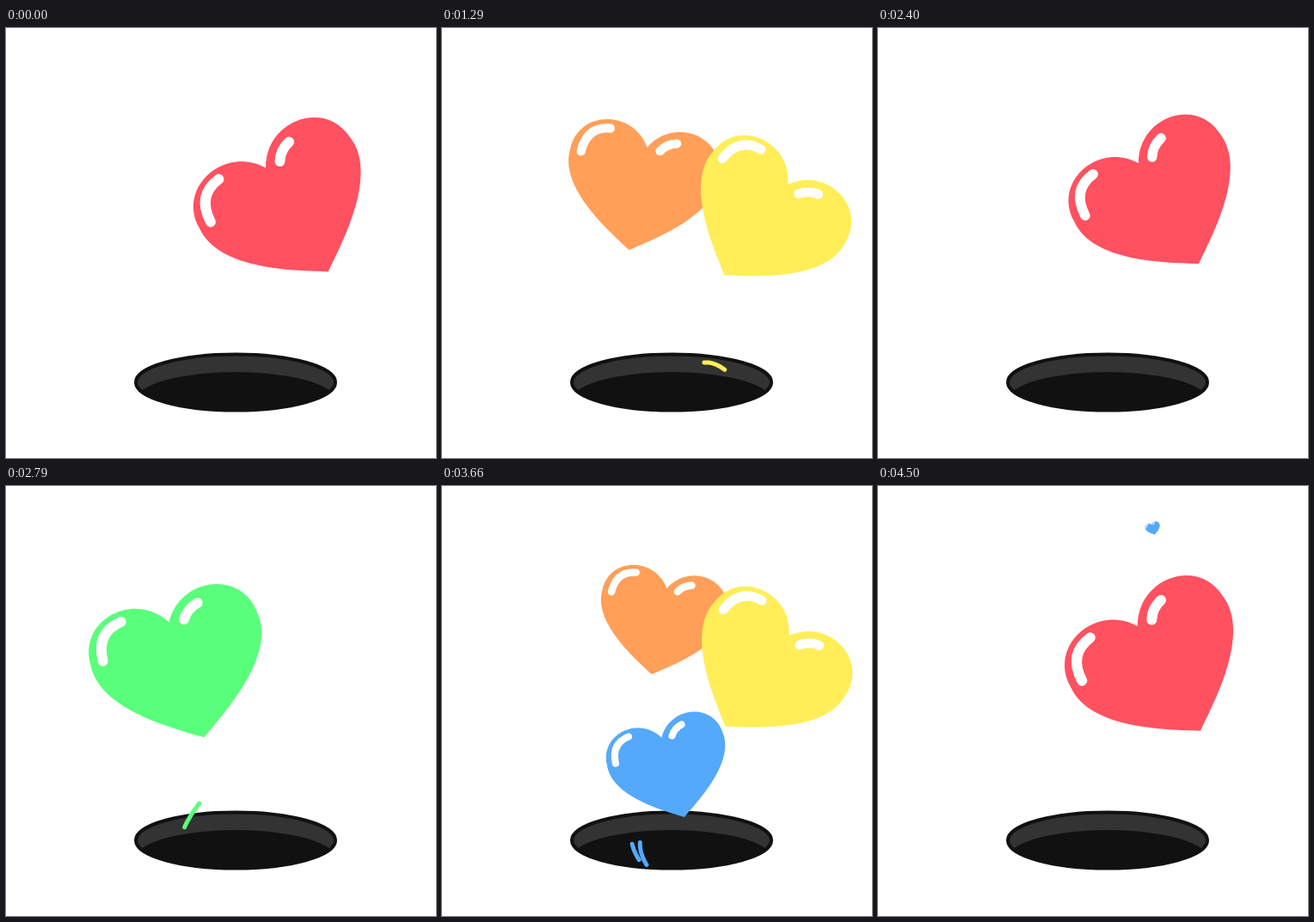
Recreate the animation shown at these times as an HTML page with a canvas. Size 500 by 500 pixels, loop 4530 ms.

```html
<!DOCTYPE html>
<html>
<head>
<meta charset="utf-8">
<style>
  html, body { margin: 0; height: 100%; overflow: hidden; background: #fff; }
  canvas { display: block; }
</style>
</head>
<body>
<canvas id="stage" width="500" height="500"></canvas>
<script>
const ctx = document.getElementById('stage').getContext('2d');
const PERIOD = 2265;          // all five hearts pop once; the loop is two rounds
const HOLE = [268, 412];
const TRAIL_LIFE = 380;

// rest/end: heart centre; trail: quadratic curve of the splash line
const hearts = [
  { color: '#ff5160', birth: 1811, life: 960, power: 6.6, size: 1, angle: 31,
    rest: [331, 211], end: [322, 18], trail: [[328, 415], [345, 380], [375, 365]] },
  { color: '#59ff7b', birth: 205, life: 894, power: 4.3, size: 1, angle: 17,
    rest: [203.5, 210], end: [284, 18], trail: [[235, 421], [178, 430], [227, 366]] },
  { color: '#ff9f58', birth: 690, life: 950, power: 4.3, size: .99, angle: -10,
    rest: [206, 213], end: [380, 18], trail: [[250, 425], [220, 343], [255, 364]] },
  { color: '#ffee58', birth: 990, life: 910, power: 4.3, size: .93, angle: -35,
    rest: [376, 221], end: [344, 13], trail: [[268, 432], [293, 367], [332, 400]] },
  { color: '#54a9fa', birth: 1350, life: 897, power: 7, size: 1.01, angle: 16,
    rest: [263, 222], end: [325, 34], trail: [[230, 436], [200, 390], [262, 366]] }
];

// Tip at the origin, cleft 142 above it
const heartShape = new Path2D(
  'M0 0C30-20 110-67 103-122C101-176 28-190 0-142C-28-190-101-176-103-122C-110-67-30-20 0 0Z');
const shine = new Path2D('M-54-159Q-86-156-88-121M39-154Q25-151 18-140');

const mix = (a, b, k) => a + (b - a) * k;
const mixPoint = (p, q, k) => p.map((v, i) => mix(v, q[i], k));

function ellipse(y, rx, ry) {
  ctx.beginPath();
  ctx.ellipse(267, y, rx, ry, 0, 0, Math.PI * 2);
}

function drawHole() {
  ctx.save();
  ellipse(412, 116, 33);
  ctx.fillStyle = '#333';
  ctx.fill();
  ctx.clip();
  ellipse(434.5, 118, 34.5);
  ctx.fillStyle = '#111';
  ctx.fill();
  ctx.restore();
  ellipse(412, 116, 32.5);
  ctx.strokeStyle = '#111';
  ctx.lineWidth = 4;
  ctx.stroke();
}

function drawTrail({ color, trail: [a, b, c] }, age, dx, dy) {
  const u = age / TRAIL_LIFE;
  if (u <= 0 || u >= 1) return;
  const tail = u * u, head = 1 - (1 - u) ** 2;
  ctx.beginPath();
  for (let i = 0; i <= 12; i++) {
    const k = mix(tail, head, i / 12);
    const [x, y] = mixPoint(mixPoint(a, b, k), mixPoint(b, c, k), k);
    ctx.lineTo(x + dx, y + dy);
  }
  ctx.strokeStyle = color;
  ctx.lineWidth = 5;
  ctx.stroke();
}

function drawHeart(heart, age) {
  if (age >= heart.life) return;
  const arrive = 1 - Math.exp(-age / 80);
  const emerge = 1 - Math.exp(-((age / 30) ** 2));
  const bounce = 1 - Math.exp(-age / 85) * Math.cos(age / 260 * Math.PI * 2);
  const leave = (age / heart.life) ** heart.power;
  const scale = heart.size * emerge * bounce * (1 - leave);
  const [x, y] = mixPoint(mixPoint(HOLE, heart.rest, arrive), heart.end, leave);
  ctx.save();
  ctx.translate(x, y);
  ctx.rotate(-heart.angle * Math.PI / 180);
  ctx.scale(scale, scale);
  ctx.translate(0, 86);
  ctx.fillStyle = heart.color;
  ctx.fill(heartShape);
  ctx.strokeStyle = '#fff';
  ctx.lineWidth = 12;
  ctx.stroke(shine);
  ctx.restore();
}

function draw(now) {
  ctx.fillStyle = '#fff';
  ctx.fillRect(0, 0, 500, 500);
  ctx.lineCap = 'round';
  drawHole();
  const active = hearts
    .map(heart => ({ heart, age: (now - heart.birth + 2 * PERIOD) % PERIOD }))
    .sort((a, b) => b.age - a.age);
  for (const { heart, age } of active) {
    drawTrail(heart, age, 0, 0);
    drawTrail(heart, age * 1.6, 10, 8);
  }
  for (const { heart, age } of active) drawHeart(heart, age);
}

const start = performance.now();
function tick() {
  draw((performance.now() - start) % (2 * PERIOD));
  requestAnimationFrame(tick);
}
tick();
</script>
</body>
</html>
```
